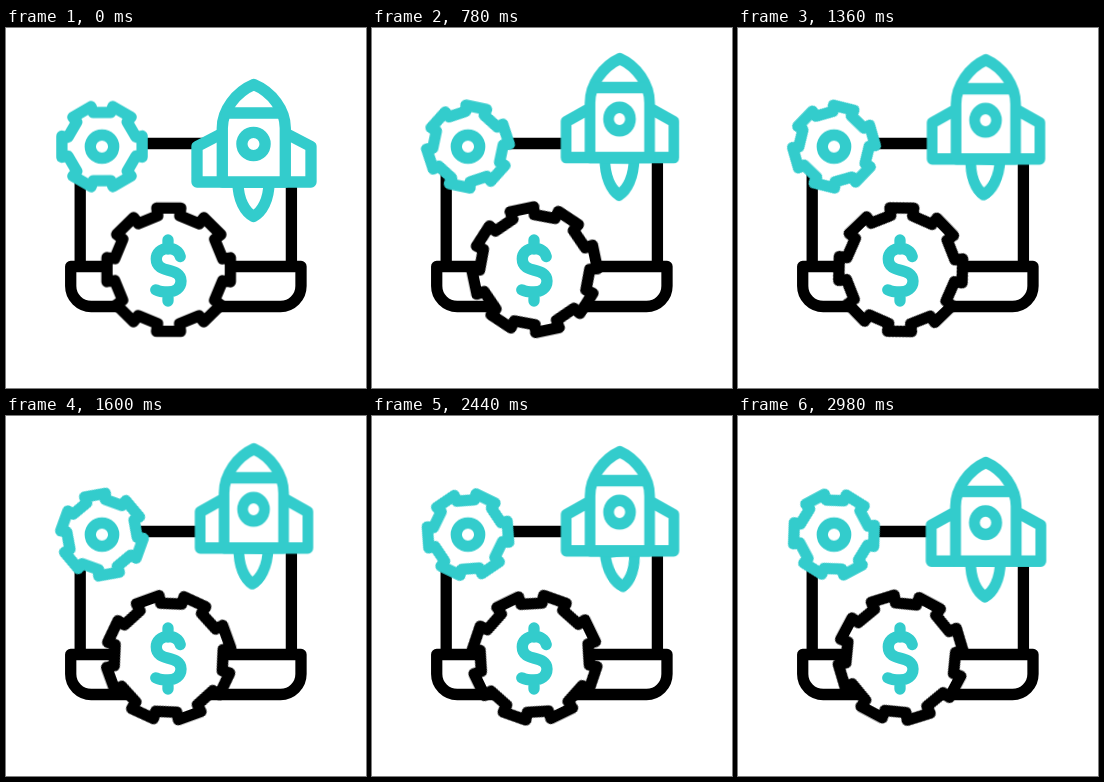
An HTML page for the animation above (3000 ms loop, 360 px wide and 360 px high).

```html
<!DOCTYPE html>
<html lang="en">
<head>
<meta charset="utf-8">
<title>Launch</title>
<style>
  html, body { margin: 0; width: 100%; height: 100%; overflow: hidden; background: #fff; }
  svg { display: block; width: 100vw; height: 100vh; }
  .ink { stroke: #000; stroke-width: 11.3; }
  .teal { stroke: #33cccc; stroke-width: 11.3; }
  .solid { fill: #fff; }
  .spin { animation: spin 3s linear infinite; }
  .back { animation-name: spin-back; }
  .rocket, .flame { animation: fly 3s cubic-bezier(.37, 0, .63, 1) infinite; }
  .rocket { transform-origin: 248px 122.5px; }
  .flame { transform-origin: 248px 154px; animation-name: sway; }
  @keyframes spin { to { transform: rotate(300deg); } }
  @keyframes spin-back { to { transform: rotate(-300deg); } }
  /* dip, launch, hover, then start to fall until the loop cuts */
  @keyframes fly {
    0% { transform: none; }
    17% { transform: translate(-.6px, 20.9px) scale(.983, .943); }
    26.7% { transform: translateY(-25.4px) scale(.945, 1.016); }
    33%, 49.7%, 66.3%, 83% { transform: translateY(-18.9px) scale(.945, 1.016); }
    41.3%, 58%, 74.7%, 91.3% { transform: translateY(-27.9px) scale(.945, 1.016); }
    100% { transform: translateY(-9px) scale(.962, 1.012); }
  }
  @keyframes sway {
    0% { transform: none; }
    17% { transform: scaleY(1.08); }
    45% { transform: rotate(3.5deg) scaleY(1.02); }
    68% { transform: rotate(-1deg) scaleY(1.02); }
    81% { transform: rotate(-6deg) scaleY(1.02); }
    100% { transform: rotate(1deg) scaleY(1.02); }
  }
</style>
</head>
<body>
<svg viewBox="0 0 360 360" fill="none" stroke-linecap="round" stroke-linejoin="round">
  <g class="ink">
    <path d="M74.2 238V115.5H285.4V238"/>
    <path class="solid" d="M64.7 238.5H295V258A20.5 20.5 0 0 1 274.5 278.5H85.2A20.5 20.5 0 0 1 64.7 258Z"/>
  </g>

  <g transform="translate(162.7 241.7)">
    <path id="big" class="ink solid spin"/>
  </g>
  <path class="teal" d="M162 212V221M162 264V273M174.2 228.5C173 223.5 168.5 220.5 162.5 220.5C154.5 220.5 150.3 225.5 150.3 231C150.3 239 157 240.8 162.5 242.3C169 244 175 246 175 253C175 260 169 264 162 264C157 264 153 263.5 149.8 261.8"/>

  <g class="teal" transform="translate(96 118.6)">
    <path id="small" class="solid spin back"/>
    <circle r="11.7"/>
  </g>

  <g class="teal rocket">
    <path class="solid flame" d="M232 154C232 172 239 184 247.5 188.5C256 184 263 172 263 154Z"/>
    <path class="solid" d="M216 105.5L191 118.5V154H305V118.5L280 105.5Z"/>
    <path class="solid" d="M216.3 154V100C216.3 82 230 64 247.8 56.5C266 64 279.3 82 279.3 100V154Z"/>
    <path d="M221 85H275"/>
    <circle cx="247.5" cy="116" r="11.6"/>
  </g>
</svg>
<script>
  // Each tooth is a flat top standing on a slightly narrower root.
  function gearPath(teeth, outer, root, halfTop, halfRoot, start) {
    const profile = [[-halfRoot, -root], [-halfTop, -outer], [halfTop, -outer], [halfRoot, -root]];
    const points = [];
    for (let i = 0; i < teeth; i++) {
      const a = start + i * 2 * Math.PI / teeth;
      const c = Math.cos(a), s = Math.sin(a);
      for (const [x, y] of profile) {
        points.push((x * c - y * s).toFixed(2) + " " + (x * s + y * c).toFixed(2));
      }
    }
    return "M" + points.join("L") + "Z";
  }
  const setGear = (id, ...shape) => document.getElementById(id).setAttribute("d", gearPath(...shape));
  setGear("big", 8, 61.7, 54, 12, 11, 0);
  setGear("small", 6, 40.1, 34, 10.5, 9.5, Math.PI / 6);
</script>
</body>
</html>
```
